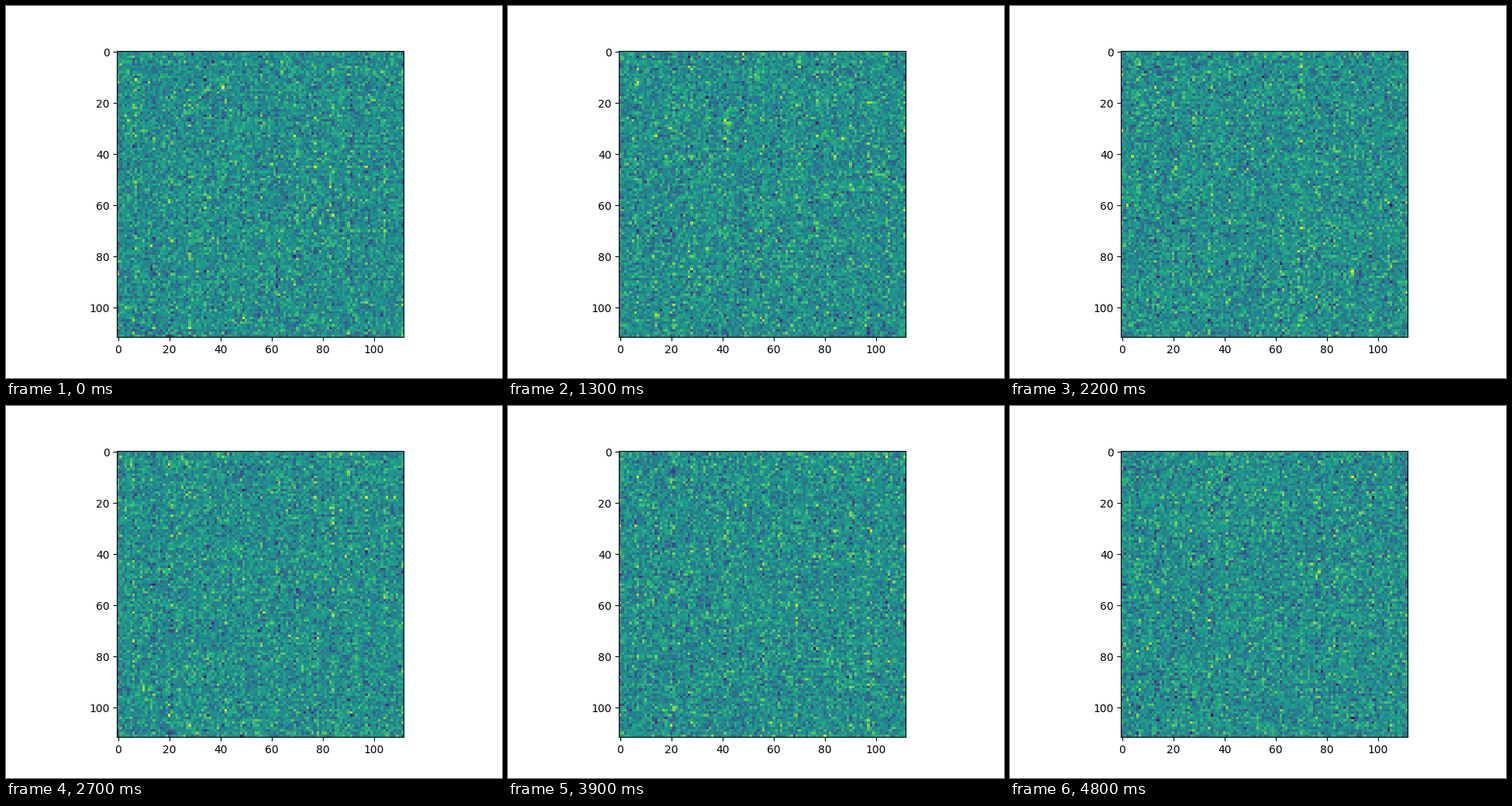
Write a matplotlib script that moves like this. It is 640 px wide and 480 px high and loops after 4.9 s.

```python
import numpy as np
import matplotlib.pyplot as plt
from matplotlib.animation import FuncAnimation

SIZE = 112
PATCH = 7
FRAMES = 49
INTERVAL = 100
LIMIT = 4.8

# Columns beside each patch border are noisier than the rest.
cols = np.arange(SIZE)
gain = np.where(np.isin(cols % PATCH, (0, PATCH - 1)), 1.35, 1.0)


def noise(i):
    rng = np.random.default_rng(1000 + i)
    drift = rng.normal(0, 0.08, SIZE)
    return (rng.normal(size=(SIZE, SIZE)) + drift) * gain


fig, ax = plt.subplots(figsize=(6.4, 4.8), dpi=100)
image = ax.imshow(noise(0), cmap="viridis", vmin=-LIMIT, vmax=LIMIT,
                  interpolation="nearest")


def update(i):
    image.set_data(noise(i))
    return [image]


anim = FuncAnimation(fig, update, frames=FRAMES, interval=INTERVAL,
                     repeat=True, repeat_delay=0, blit=False)
plt.show()
```
